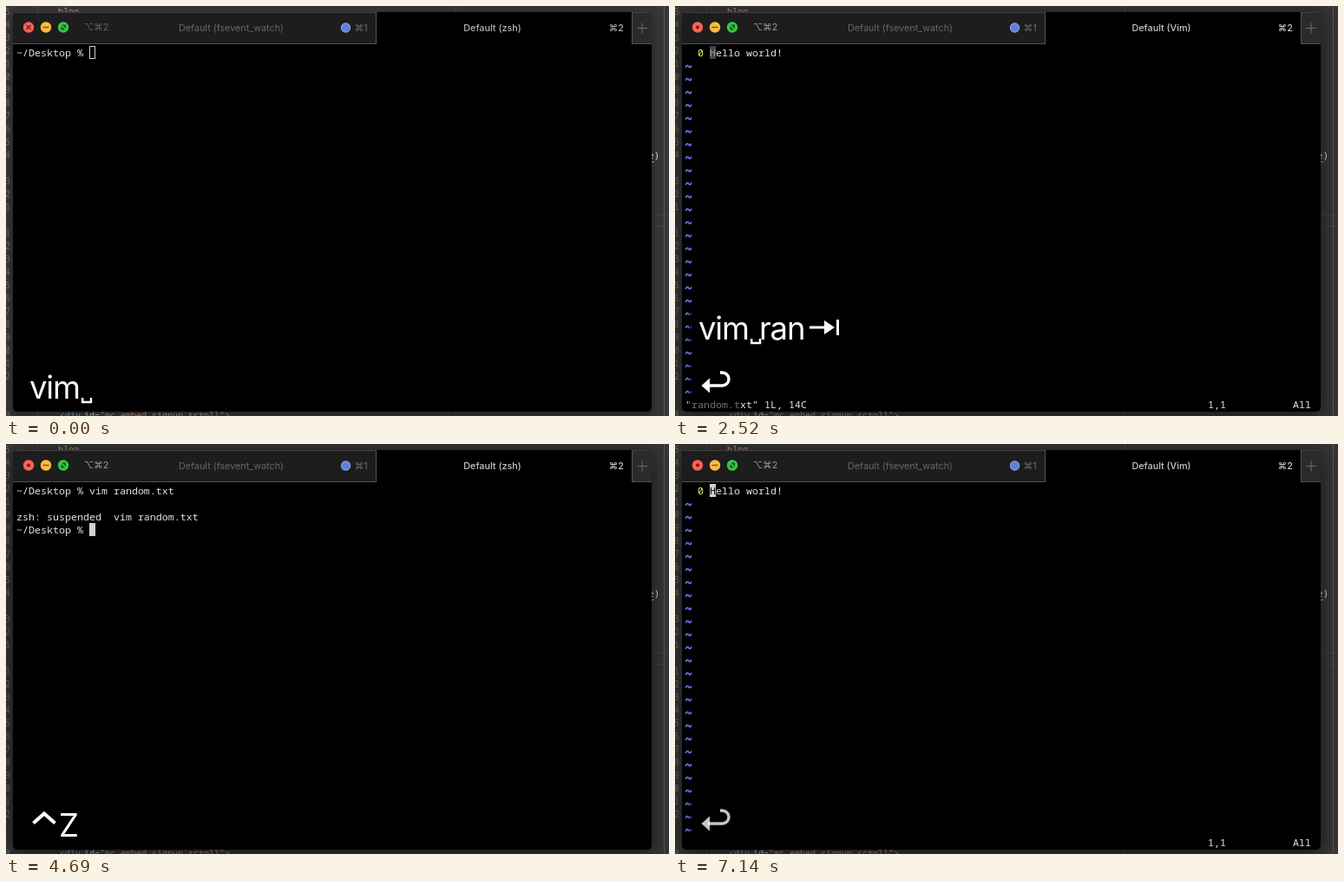
Recreate the animation shown at these times as an HTML page with a canvas. Size 764 by 472 pixels, loop 7210 ms.

```html
<!DOCTYPE html>
<html lang="en">
<head>
<meta charset="utf-8">
<title>Suspending Vim</title>
<style>
html, body { margin: 0; width: 100%; height: 100%; overflow: hidden; background: #333; }
canvas { display: block; }
</style>
</head>
<body>
<canvas id="stage" width="764" height="472"></canvas>
<script>
const c = document.getElementById('stage').getContext('2d');
const LOOP = 7210, STEP = 70;
const MONO = '"Noto Sans Mono", "DejaVu Sans Mono", monospace';
const UI = 'Inter, "DejaVu Sans", sans-serif';
const BIG = '36.5px ' + UI;
const TERM = '500 11.67px ' + MONO;

// Key times
const FOCUS = 70, OPEN = 1750, SUSPEND = 3430, RESUME = 5740;

const typedFirst = [[0, ''], [70, 'vim'], [140, 'vim '], [770, 'vim r'], [910, 'vim ra'],
  [980, 'vim ran'], [1120, 'vim random.txt ']];
const typedSecond = [[0, ''], [5180, 'f'], [5390, 'fg']];

// Cursor opacity, linear between points
const blink = [[0, 1], [490, 1], [700, 0], [769, 0], [770, 1], [2040, 1], [2240, 0], [2450, 0],
  [2660, 1], [2940, 1], [3100, 0], [3429, 0], [3430, 1], [3910, 1], [3990, 0], [4480, 0],
  [4690, 1], [6230, 1], [6300, 0], [6790, 0], [7000, 1], [LOOP, 1]];

// Keystroke rows: time of last key, time pushed up, keys as [time, drawer, right edge]
const word = (s, x) => () => {
  c.letterSpacing = '-1.2px';
  text(s, x, 451.5, BIG, '#fff');
};
const rows = [
  { last: 1120, up: 1610, keys: [[0, word('vim', 27), 86], [0, space, 99], [770, word('r', 97), 110],
    [910, word('a', 109.5), 131], [980, word('n', 129), 151], [1120, tab, 189]] },
  { last: 1610, up: SUSPEND, keys: [[1610, enter, 63]] },
  { last: SUSPEND, up: 1e5, keys: [[SUSPEND, control, 57], [SUSPEND, word('Z', 61), 84]] },
  { last: 5390, up: 5670, keys: [[5180, word('f', 26.5), 37], [5390, word('g', 38), 58]] },
  { last: 5670, up: 1e5, keys: [[5670, enter, 63]] }
];

function text(s, x, y, font, color, align = 'left') {
  c.font = font;
  c.fillStyle = color;
  c.textAlign = align;
  c.fillText(s, x, y);
}
function rect(x, y, w, h, color) {
  c.fillStyle = color;
  c.fillRect(x, y, w, h);
}
function disc(x, y, r, color) {
  c.fillStyle = color;
  c.beginPath();
  c.arc(x, y, r, 0, 7);
  c.fill();
}
function stroke(d, color, width) {
  c.strokeStyle = color;
  c.lineWidth = width;
  c.stroke(new Path2D(d));
}
function fill(d, color) {
  c.fillStyle = color;
  c.fill(new Path2D(d));
}
function latest(list, t) {
  return list.filter(k => k[0] <= t).pop()[1];
}
function lerp(points, t) {
  const i = Math.max(1, points.findIndex(p => p[0] >= t));
  const [a, u] = points[i - 1], [b, v] = points[i];
  return u + (v - u) * (t - a) / (b - a);
}

// Key symbols
function space() { stroke('M88.2 451V456H98V451', '#fff', 2.4); }
function tab() {
  stroke('M155 438H175M187.5 429V447', '#fff', 3);
  fill('M172 430L184 438L172 446Z', '#fff');
}
function enter() {
  stroke('M38 437H54.5A7.5 7.5 0 0 0 54.5 422H52', '#fff', 3.4);
  fill('M30.5 437L40 428.5V445.5Z', '#fff');
}
function control() { stroke('M31.5 436.5L44 425.5L56.5 436.5', '#fff', 4); }

function backdrop() {
  rect(0, 0, 764, 472, '#363636');
  for (const x of [36, 518]) rect(x, 0, 1, 472, '#4b4b4b');
  rect(745, 240, 19, 1, '#424242');
  rect(745, 253, 19, 1, '#424242');
  rect(758, 0, 1, 472, '#575757');
  const font = '10px ' + MONO;
  // Relative line numbers, counting away from the gap
  for (let i = 0; i < 29; i++) {
    const n = i < 12 ? 15 - i : Math.abs(16 - i);
    if (i !== 12 && n) text(n, 5, 10 + 15 * i, font, '#6c6c6c', 'right');
  }
  text('13', 5, 475, font, '#6c6c6c', 'right');
  text('blog', 60, 10, font, '#bd8b8b');
  text('<div', 62, 475, font, '#6b9bc4');
  text('id=', 90, 475, font, '#a5c8d8');
  text('"mc_embed_signup_scroll"', 108, 475, font, '#b98a6c');
  text('>', 252, 475, font, '#6b9bc4');
  text('e)', 740, 176, '11px ' + MONO, '#ddd');
  rect(741, 179, 6, 1, '#aaa');
}

function titleBar(t, vim) {
  const focused = t >= FOCUS;
  rect(8, 7, 736, 37, '#1d1d1d');
  rect(722, 7, 22, 36, '#2b2b2b');
  rect(8, 7, 736, 1, '#414141');
  rect(427, 7, 294, 37, '#000');
  rect(8, 43, 419, 1, '#515151');
  rect(721, 43, 23, 1, '#515151');
  rect(426, 7, 1, 37, '#555');
  rect(721, 7, 1, 37, '#555');

  disc(26, 24.5, 6.2, '#fb6058');
  disc(46, 24.5, 6.2, '#fcbc40');
  disc(66, 24.5, 6.2, '#34c748');
  if (t < OPEN) stroke('M23.5 22L28.5 27M28.5 22L23.5 27', '#741a16', 1.3);
  else disc(26, 24.5, 2, '#741a16');
  stroke('M42.5 24.5H49.5', '#84560c', 1.5);
  fill('M63.5 23V27.5H68ZM64.5 21.5H69V26Z', '#10591b');

  const tabFont = '10.8px ' + UI, boldFont = '500 10.8px ' + UI;
  text('⌥⌘2', 90, 27.5, tabFont, focused ? '#9b9b9b' : '#626262');
  text('Default (fsevent_watch)', 259.5, 29, tabFont, '#666', 'center');
  disc(391.5, 25, 5.7, '#8da0e4');
  disc(391.5, 25, 4.6, '#607fdc');
  text('⌘1', 401.5, 29, tabFont, '#6c6c6c');
  text(vim ? 'Default (Vim)' : 'Default (zsh)', 560.5, 29, boldFont, focused ? '#c8c8c8' : '#b4b4b4', 'center');
  text('⌘2', 694.5, 29, boldFont, focused ? '#ccc' : '#b0b0b0');
  stroke('M727 25.5H739M733 19.5V31.5', '#6c6c6c', 1);
}

// Terminal text on a 7 by 15 pixel grid
function term(s, col, row, color = '#e4e4e4') {
  text(s, 12 + 7 * col, 58 + 15 * row, TERM, color);
}
function cursor(col, row, t, under = '') {
  const x = 12 + 7 * col, y = 46 + 15 * row;
  if (t < FOCUS) {
    c.strokeStyle = '#d0d0d0';
    c.lineWidth = 1;
    c.strokeRect(x + .5, y + .5, 6, 14);
    return;
  }
  c.globalAlpha = lerp(blink, t);
  rect(x, y, 7, 15, '#d0d0d0');
  term(under, col, row, '#000');
  c.globalAlpha = 1;
}
function shell(t) {
  const prompt = '~/Desktop % ';
  if (t < OPEN) {
    const typed = latest(typedFirst, t);
    term(prompt + typed, 0, 0);
    cursor(12 + typed.length, 0, t);
  } else {
    const typed = latest(typedSecond, t);
    term(prompt + 'vim random.txt', 0, 0);
    term('zsh: suspended  vim random.txt', 0, 2);
    term(prompt + typed, 0, 3);
    cursor(12 + typed.length, 3, t);
  }
}
function editor(t) {
  term('0', 2, 0, '#f8f36e');
  term('Hello world!', 4, 0);
  cursor(4, 0, t, 'H');
  for (let i = 1; i <= 26; i++)
    stroke(`M12.5 ${55.8 + 15 * i}c.3-3 2.4-2.6 3.2-1.2s2.7 1.6 3-1.2`, '#7a72ff', 1.6);
  if (t < RESUME) term('"random.txt" 1L, 14C', 0, 27);
  term('1,1', 86, 27);
  term('All', 100, 27);
}

function captions(t) {
  for (const { last, up, keys } of rows) {
    const shown = keys.filter(k => k[0] <= t);
    const alpha = Math.min(1, 1 - (t - last - 1400) / 310);
    if (!shown.length || alpha <= 0) continue;
    c.save();
    c.globalAlpha = alpha;
    if (t >= up) c.translate(0, -68);
    c.fillStyle = 'rgba(0,0,0,.5)';
    c.beginPath();
    c.roundRect(16, 410, shown[shown.length - 1][2] - 4, 57, 5);
    c.fill();
    for (const key of shown) key[1]();
    c.restore();
  }
}

function draw(t) {
  const vim = t >= OPEN && t < SUSPEND || t >= RESUME;
  backdrop();
  c.save();
  c.shadowColor = t < FOCUS ? 'rgba(0,0,0,.35)' : 'rgba(0,0,0,.6)';
  c.shadowBlur = t < FOCUS ? 12 : 24;
  c.shadowOffsetY = 4;
  c.fillStyle = '#000';
  c.beginPath();
  c.roundRect(8, 7, 736, 460, 5);
  c.fill();
  c.restore();
  c.save();
  c.clip();
  titleBar(t, vim);
  (vim ? editor : shell)(t);
  c.restore();
  captions(t);
}

function tick() {
  draw(Math.floor(performance.now() % LOOP / STEP) * STEP);
  requestAnimationFrame(tick);
}
tick();
</script>
</body>
</html>
```
